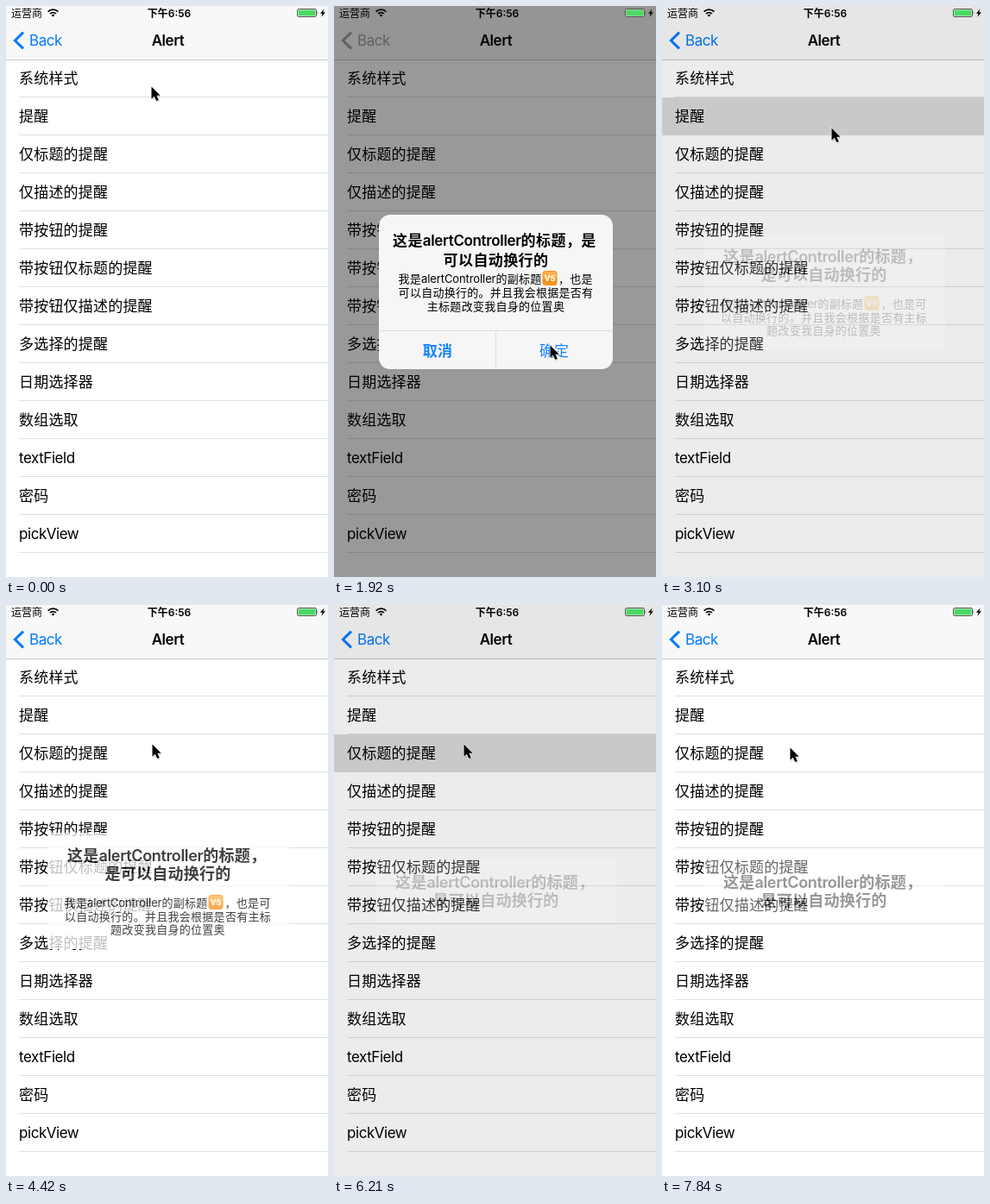
Recreate the animation shown at these times as an HTML page. Size 373x662 px, loop 7990 ms.

```html
<!DOCTYPE html>
<html lang="zh-CN">
<head>
<meta charset="utf-8">
<title>Alert</title>
<style>
html, body { margin: 0; width: 100%; height: 100%; overflow: hidden; background: #fff; }
svg { display: block; width: 373px; height: 662px; }
text { font-family: Inter, "Noto Sans CJK SC", "Noto Sans CJK", sans-serif; white-space: pre; }
.row { font-size: 17px; letter-spacing: .2px; }
.row tspan, .nav { font-size: 17px; letter-spacing: -.45px; }
.t17 { font-size: 17px; font-weight: 600; letter-spacing: .4px; }
.t18 { font-size: 18px; font-weight: 600; letter-spacing: .25px; }
.t17 tspan, .t18 tspan { letter-spacing: -.35px; }
.msg { font-size: 13px; letter-spacing: .28px; }
.msg tspan { letter-spacing: -.1px; }
.btn { font-size: 17px; fill: #1283ff; letter-spacing: .2px; }
.status { font-size: 12px; }
</style>
</head>
<body>
<svg viewBox="0 0 373 662">
  <rect width="373" height="662" fill="#fff"/>
  <g id="list"></g>
  <rect id="hl" width="373" height="44" fill="#d9d9d9"/>
  <g id="labels"></g>
  <rect width="373" height="62" fill="#f8f8f8"/>
  <rect y="62" width="373" height="1" fill="#c9c9cb"/>
  <g id="back" fill="#007aff">
    <path id="chevron" d="M20 30.6 10.4 40 20 49.4" fill="none" stroke="#007aff" stroke-width="3"/>
    <text class="nav" x="27" y="46">Back</text>
  </g>
  <text class="nav" x="187.5" y="46" text-anchor="middle" font-weight="600">Alert</text>
  <rect id="dim" width="373" height="662"/>
  <g id="system">
    <rect x="52" y="242" width="271" height="179" rx="13" fill="#f6f6f6"/>
    <path d="M52 376.5H323M187.5 377V421" stroke="#dcdcde"/>
  </g>
  <g id="full">
    <rect x="48" y="264" width="280" height="135" rx="5" fill="#fff"/>
  </g>
  <g id="brief">
    <rect x="48" y="295" width="280" height="73" rx="5" fill="#fff"/>
  </g>
  <g class="status">
    <text x="6" y="12.5">运营商</text>
    <g fill="none" stroke="#000" stroke-width="1.7">
      <path d="M48.6 6.6a8.2 8.2 0 0 1 11.8 0M51 9a4.9 4.9 0 0 1 7 0"/>
    </g>
    <path d="M54.5 12.6 52.6 10.7a2.7 2.7 0 0 1 3.8 0Z"/>
    <text x="189" y="12.5" text-anchor="middle" font-weight="600">下午6:56</text>
    <rect x="337.5" y="3.5" width="22" height="9" rx="1.6" fill="#fff" fill-opacity=".6" stroke="#555"/>
    <rect x="338.5" y="4.5" width="20" height="7" rx=".6" fill="#4cd964"/>
    <path d="M360.6 6.2q1.6 1.8 0 3.6Z" fill="#333"/>
    <path d="M368.4 3.4 364 8.8h2.5l-1 4 4.4-5.6h-2.6Z"/>
  </g>
  <g id="cursor">
    <path d="M1 2V16L4 13 6.4 18 9 17 6.8 12H11Z" fill="#000" opacity=".22"/>
    <path d="M0 0V14.2L3.2 11.2 5.7 16.6 8.3 15.4 5.9 10.3H10.2Z" stroke="#fff" stroke-width="1.3" paint-order="stroke"/>
  </g>
</svg>
<script>
const $ = id => document.getElementById(id);
const add = (id, html) => $(id).insertAdjacentHTML('beforeend', html);
const latin = s => s.replace(/[a-z]+/gi, '<tspan>$&</tspan>');
const line = (cls, x, y, s, anchor = 'start') =>
  `<text class="${cls}" x="${x}" y="${y}" text-anchor="${anchor}">${latin(s)}</text>`;
const mid = (cls, y, s) => line(cls, 187.5, y, s, 'middle');
const badge = (x, y) =>
  `<rect x="${x}" y="${y}" width="17" height="17" rx="3.5" fill="#f7941d"/>
   <rect x="${x + 1}" y="${y + 1}" width="15" height="8" rx="2.5" fill="#ffb24d"/>
   <text x="${x + 8.5}" y="${y + 12}" font-size="9" font-weight="700" fill="#fff" text-anchor="middle">VS</text>`;

const rows = ['系统样式', '提醒', '仅标题的提醒', '仅描述的提醒', '带按钮的提醒', '带按钮仅标题的提醒',
  '带按钮仅描述的提醒', '多选择的提醒', '日期选择器', '数组选取', 'textField', '密码', 'pickView'];
rows.forEach((s, i) => {
  add('list', `<rect x="15" y="${105 + 44 * i}" width="358" height="1" fill="#dfdfe2"/>`);
  add('labels', line('row', 15, 90 + 44 * i, s));
});

add('system',
  line('t17', 68, 278, '这是alertController的标题，是') + mid('t17', 301, '可以自动换行的') +
  line('msg', 74.5, 321, '我是alertController的副标题') + badge(241.5, 307) + line('msg', 260, 321, '，也是') +
  mid('msg', 337, '可以自动换行的。并且我会根据是否有') + mid('msg', 353, '主标题改变我自身的位置奥') +
  `<g font-weight="600">${line('btn', 120, 405.5, '取消', 'middle')}</g>` +
  line('btn', 255, 405.5, '确定', 'middle'));

const heading = y => line('t18', 71, y, '这是alertController的标题，') + mid('t18', y + 21, '是可以自动换行的');
add('full', heading(296.5) +
  line('msg', 67.5, 350, '我是alertController的副标题') + badge(234.5, 336) + line('msg', 253.5, 350, '，也是可') +
  mid('msg', 365.5, '以自动换行的。并且我会根据是否有主标') + mid('msg', 381, '题改变我自身的位置奥'));
add('brief', heading(327.5));

// time, x, y
const moves = [
  [0, 168, 93], [150, 168, 91], [300, 168, 88], [450, 168, 87], [890, 168, 93], [1040, 170, 124],
  [1190, 190, 215], [1340, 225, 320], [1480, 245, 375], [1630, 250, 393], [2070, 240, 340],
  [2220, 217, 243], [2370, 205, 185], [2510, 199, 155], [2660, 197, 143], [2810, 196, 141],
  [3250, 198, 165], [3400, 204, 215], [3540, 210, 264], [3680, 196, 225], [3830, 177, 180],
  [3980, 169, 161], [4570, 170, 172], [4720, 172, 179], [5460, 168, 171], [5610, 163, 163],
  [6210, 150, 161], [6950, 148, 165]
];
// time, row, highlight, dim, panel, panel opacity, scale
const none = t => [t, 0, 0, 0, '', 0, 1];
const popIn = (t, row, panel) => [
  [t, row, 1, .074, panel, .2, 1], [t + 145, row, .2, .34, panel, .92, 1], [t + 290, row, 0, .37, panel, 1, 1]
];
const views = [
  none(0), [600, 0, 1, 0, '', 0, 1],
  [740, 0, .9, .15, 'system', .35, 1.12], [890, 0, .5, .35, 'system', .9, 1.02],
  [1040, 0, .15, .4, 'system', 1, 1], [1190, 0, 0, .4, 'system', 1, 1],
  [1930, 0, 0, .28, 'system', .7, 1], [2070, 0, 0, .11, 'system', .28, 1], [2220, 0, 0, .015, 'system', .05, 1],
  none(2370), ...popIn(2958, 1, 'full'),
  [4420, 0, 0, 0, 'full', .75, 1], [4570, 0, 0, 0, 'full', .2, 1],
  none(4720), ...popIn(6210, 2, 'brief'),
  [7840, 0, 0, 0, 'brief', .4, 1]
];
const at = (table, t) => table.findLast(step => step[0] <= t);

function draw(t) {
  const [, x, y] = at(moves, t);
  const [, row, hl, dim, panel, alpha, scale] = at(views, t);
  $('cursor').setAttribute('transform', `translate(${x + .5} ${y + .5})`);
  $('hl').setAttribute('y', 62 + 44 * row);
  $('hl').setAttribute('opacity', hl);
  $('dim').setAttribute('opacity', dim);
  for (const id of ['system', 'full', 'brief']) $(id).setAttribute('opacity', id === panel ? alpha : 0);
  $('system').setAttribute('transform', `translate(187.5 331.5) scale(${scale}) translate(-187.5 -331.5)`);
  const tint = t >= 740 && t < 1930 ? '#a0a0a0' : '#007aff';
  $('back').setAttribute('fill', tint);
  $('chevron').setAttribute('stroke', tint);
}
const start = performance.now();
function tick() {
  draw((performance.now() - start) % 7990);
  requestAnimationFrame(tick);
}
tick();
</script>
</body>
</html>
```
